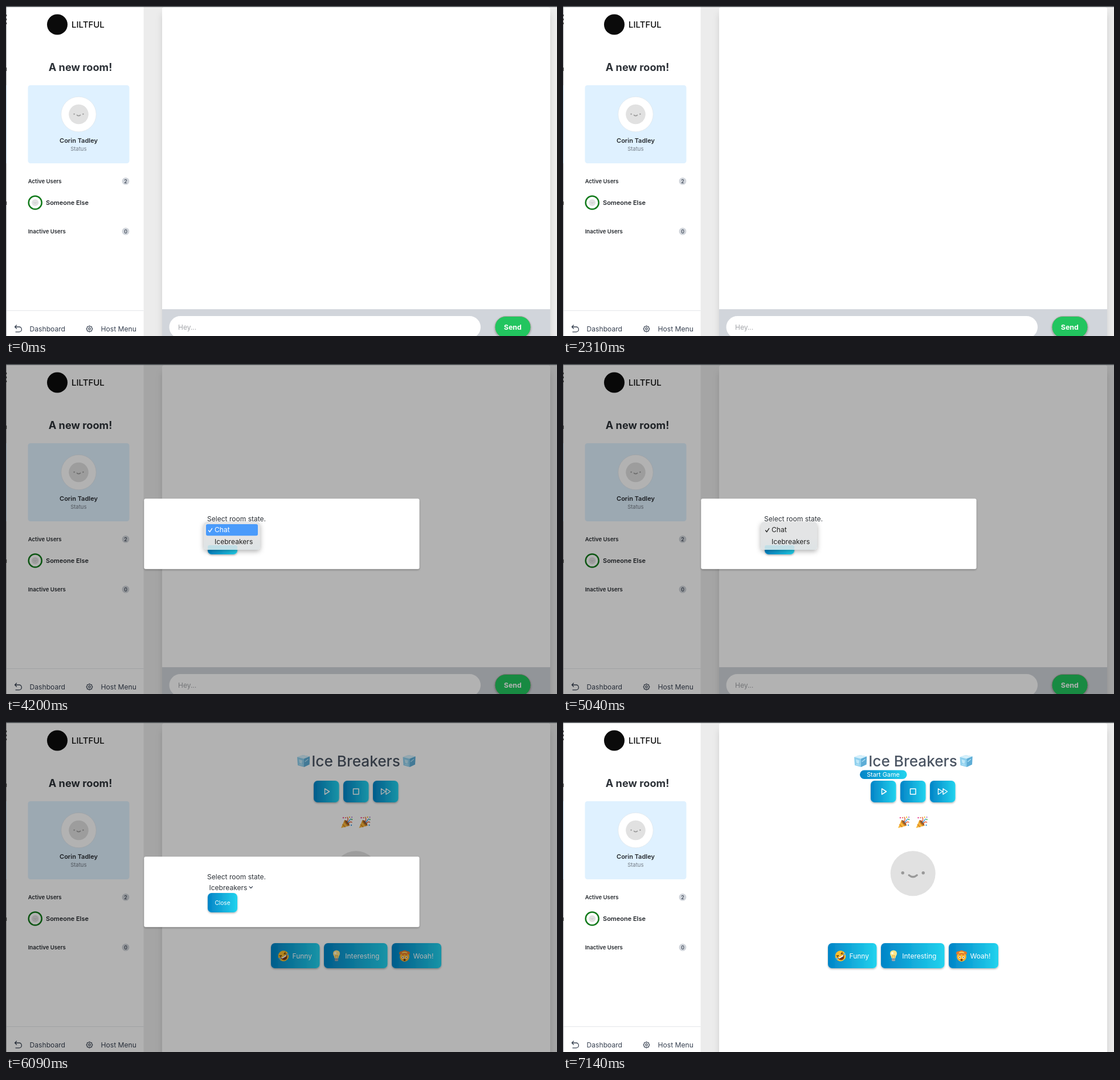
An HTML page for the animation above (8 s loop, 967x579 px).

```html
<!DOCTYPE html>
<html lang="en">
<head>
<meta charset="utf-8">
<title>Room</title>
<style>
html, body { margin: 0; width: 100%; height: 100%; overflow: hidden; background: #ececec; }
svg { display: block; width: 967px; height: 579px; font-family: Inter, Roboto, sans-serif; }
</style>
</head>
<body>
<svg id="stage" viewBox="0 0 967 579"></svg>
<script>
const LOOP = 8000;
const stage = document.getElementById('stage');

const rect = (x, y, w, h, r, fill, more = '') =>
  `<rect x="${x}" y="${y}" width="${w}" height="${h}" rx="${r}" fill="${fill}" ${more}/>`;
const circle = (x, y, r, fill, more = '') =>
  `<circle cx="${x}" cy="${y}" r="${r}" fill="${fill}" ${more}/>`;
const line = (d, color, width, more = '') =>
  `<path d="${d}" fill="none" stroke="${color}" stroke-width="${width}" stroke-linecap="round" stroke-linejoin="round" ${more}/>`;
const shape = (d, fill) => `<path d="${d}" fill="${fill}"/>`;
const text = (s, x, y, size, fill = '#30353b', weight = 400, anchor = 'start') =>
  `<text x="${x}" y="${y}" font-size="${size}" fill="${fill}" font-weight="${weight}" text-anchor="${anchor}">${s}</text>`;
const at = (x, y, art, more = '') => `<g transform="translate(${x} ${y}) ${more}">${art}</g>`;
const group = (id, ...parts) => `<g id="${id}">${parts.join('')}</g>`;

const face = (x, y, r) => at(x, y,
  circle(0, 0, 39.5, '#e1e1e1') + circle(-18, -1, 2.7, '#999') + circle(18, -1, 2.7, '#999') +
  line('M-7 3Q0 9 7 3', '#999', 3.4), `scale(${r / 39.5})`);
const badge = (y, n) => circle(210, y, 6.4, '#d1d5db') + text(n, 210, y + 3.1, 8.8, '#374151', 500, 'middle');
const button = (x, y, w, h) => rect(x, y, w, h, 7, 'url(#sea)', 'filter="url(#soft)"');

// Emoji, each drawn about its own centre
const ice = shape('M-11-7L-1-10.5 11-8 10.5 6 1 10.5-10 7.5Z', '#8fd0ee') +
  shape('M-11-7L-1-10.5 11-8 1-4Z', '#d5f0fb') + shape('M1-4L11-8 10.5 6 1 10.5Z', '#5eadd6') +
  shape('M-8-3L-2-1-3 5-7 3Z', '#c0e8f8') + line('M3 1L8-3M-7 6L-2 7', '#b4e2f5', 1.3);
const popper = shape('M-10 10L-4-4Q4-1 5 6Z', '#f6b73c') + line('M-7 4L-3 8M-4-1L2 6', '#d98220', 1.6) +
  shape('M-4-4Q3-4 5 6Q-1 4-4-4Z', '#8f5b2d') +
  line('M0-2Q4-4 1-9M3 2Q6-2 9 0', '#e4572e', 1.4) + line('M2 0L7-6', '#3c9be0', 1.4) +
  circle(-6, -8, 1.3, '#e9529c') + circle(5, -9, 1.2, '#f2c230') + circle(9, -5, 1.2, '#53b95b') +
  circle(8, 5, 1.2, '#3c9be0') + circle(-2, -8, 1, '#e4572e') + circle(9, -9, 1, '#9d5cc9');
const laugh = circle(0, 0, 9.3, '#fbc02d') +
  line('M-6-4L-2.5-2.5-6-1M6-4L2.5-2.5 6-1', '#6b3e12', 1.3) +
  shape('M-6 1H6Q5 7.5 0 7.5T-6 1Z', '#7a3513') + shape('M-5 1H5L4 3H-4Z', '#fff') +
  shape('M-9-1Q-4 0-7 3Q-10 3-9-1ZM9-1Q4 0 7 3Q10 3 9-1Z', '#4fb3f0');
const bulb = shape('M-3.5 4C-3.5 0-6-1-6-4.5A6 5.5 0 0 1 6-4.5C6-1 3.5 0 3.5 4Z', '#fde68a') +
  circle(-2, -5, 2, '#fffbe6') + line('M-1.5 3L-2-1 0 0 2-1 1.5 3', '#e0a030', .9) +
  rect(-3, 4, 6, 5, 1.5, '#a4a9ad') + line('M-2.5 6H2.5', '#74797d', .8);
const blown = circle(0, 1, 8.4, '#fbb32d') + shape('M-9-3Q-11-9-4-9Q0-12 4-9Q11-9 9-3L5-4 3-1 0-4-3-1-5-4Z', '#e2762b') +
  shape('M-5-5Q-5-8 0-8T5-5L0-6Z', '#f9d65c') + circle(-3.2, 2, 2, '#fff') + circle(3.2, 2, 2, '#fff') +
  circle(-3.2, 2, .9, '#5b3413') + circle(3.2, 2, .9, '#5b3413') +
  `<ellipse cy="6.5" rx="2" ry="1.7" fill="#6b3413"/>`;

const teeth = Array.from({ length: 8 }, (_, i) =>
  `<path d="M0-4.8V-5.8" stroke="#374151" stroke-width="2" transform="rotate(${i * 45})"/>`).join('');
const gear = circle(0, 0, 4.7, 'none', 'stroke="#374151" stroke-width="1.2"') + teeth +
  circle(0, 0, 1.8, 'none', 'stroke="#374151" stroke-width="1.2"');

const defs = `<defs>
<linearGradient id="sea"><stop stop-color="#0284c7"/><stop offset="1" stop-color="#22d3ee"/></linearGradient>
<linearGradient id="glass" x2="0" y2="1"><stop offset=".55" stop-color="#e3e4e5"/><stop offset="1" stop-color="#dde3e5"/></linearGradient>
<filter id="soft" x="-20%" y="-20%" width="140%" height="150%"><feDropShadow dx="0" dy="1.5" stdDeviation="1.5" flood-opacity=".3"/></filter>
<filter id="wide" x="-20%" y="-20%" width="140%" height="150%"><feDropShadow dx="0" dy="3" stdDeviation="4" flood-opacity=".3"/></filter>
<filter id="panelShade" x="-5%" y="-5%" width="110%" height="110%"><feDropShadow dx="0" dy="12" stdDeviation="6" flood-opacity=".13"/></filter>
</defs>`;

const sidebar = group('sidebar',
  rect(0, 0, 241.5, 579, 0, '#fff'),
  rect(0, 0, 1, 579, 0, '#a3a5a8'),
  [15, 22, 29].map(y => rect(0, y, 1.2, 3, 0, '#222')).join(''),
  rect(0, 108, 1.2, 6, 0, '#333'), rect(0, 139, 1, 137, 0, '#a9c0d2'), rect(0, 343, 1.2, 6, 0, '#333'),
  circle(90, 32.5, 18, '#0b0b0b'),
  text('LILTFUL', 115, 38, 15, '#0b0b0b', 500),
  text('A new room!', 130.5, 114.3, 18.2, '#2d3238', 700, 'middle'),
  rect(38.5, 139, 178, 137, 4.5, '#dff1ff'),
  circle(127.5, 190, 30.8, '#fff', 'stroke="#dfe6ec" stroke-width=".8"'),
  face(127.5, 190, 17.3),
  text('Corin Tadley', 127.5, 239.8, 11, '#25292e', 600, 'middle'),
  text('Status', 127.3, 253.5, 9.5, '#737b85', 400, 'middle'),
  text('Active Users', 38.7, 310.8, 9.6, '#25292e', 600), badge(307.4, 2),
  circle(51.2, 345, 11.5, '#fff', 'stroke="#127a1b" stroke-width="2.5"'), face(51.2, 345, 6),
  text('Someone Else', 70, 349, 11, '#25292e', 600),
  text('Inactive Users', 38.7, 398.8, 9.6, '#25292e', 600), badge(395.4, 0),
  rect(1, 534, 240.5, 1, 0, '#e3e6ea'),
  line('M18.5 560L15.5 563 18.5 566M15.5 563H23A4.4 4.4 0 0 1 23 571.8H17', '#374151', 1.3),
  text('Dashboard', 41.6, 570.8, 12.1, '#374151'),
  at(146.5, 566.5, gear),
  text('Host Menu', 166.6, 570.8, 12.1, '#374151'));

const chat = group('chat',
  rect(274, 532, 681, 47, 0, '#d1d5db'),
  rect(286.5, 544, 546.5, 39, 19.5, '#fff'),
  text('Hey...', 302, 568, 12, '#a3a5a9'),
  rect(858, 544.5, 63, 38, 19, '#22c55e', 'stroke="#b3a5a3" stroke-width="1" filter="url(#soft)"'),
  text('Send', 889.3, 568, 12.4, '#fff', 700, 'middle'));

const game = group('game',
  at(522, 68.5, ice), at(707.5, 68.5, ice),
  text('Ice Breakers', 614, 78, 26.2, '#4b5563', 500, 'middle'),
  [540, 592, 644].map(x => button(x, 103, 44.5, 38)).join(''),
  line('M559.5 117V127L567.5 122Z', '#fff', 1.5),
  line('M609.5 117.2H619V126.8H609.5Z', '#fff', 1.5),
  line('M658.5 117V127L666 122ZM667 117V127L674.5 122Z', '#fff', 1.4),
  at(598, 176, popper), at(629.5, 176, popper),
  face(614.2, 265.8, 39.5),
  button(465, 388, 85.5, 44), button(558, 388, 111.5, 44), button(677, 388, 87, 44),
  at(487, 410.5, laugh, 'rotate(-30)'), at(580, 410.5, bulb), at(699.5, 411, blown),
  text('Funny', 502.5, 414.7, 12, '#fff'),
  text('Interesting', 595.3, 414.7, 12, '#fff'),
  text('Woah!', 714.6, 414.7, 12, '#fff'));

const tip = group('tip',
  rect(521, 84.5, 82.5, 15.5, 7.75, 'url(#sea)'),
  text('Start Game', 562, 96, 10.9, '#fff', 400, 'middle'));

const modal = group('modal',
  rect(0, 1, 967, 578, 0, '#000', 'opacity=".3"'),
  rect(242.3, 236.3, 483.2, 123.5, 3, '#fff', 'filter="url(#soft)"'),
  text('Select room state.', 353, 275.7, 12.05),
  rect(353.5, 281.5, 82.5, 17, 3, '#fff', 'id="focus" stroke="#176d9c" stroke-width="1.9"'),
  `<text id="choice" x="356.4" y="294.6" font-size="12.05" fill="#30353b"></text>`,
  line('M427 288.7L429.8 291.5 432.6 288.7', '#374151', 1.2),
  button(354, 300, 52, 34),
  text('Close', 380, 320.8, 10.1, '#fff', 400, 'middle'),
  group('menu',
    rect(347, 277, 99, 49, 5.5, 'url(#glass)', 'filter="url(#wide)"'),
    rect(354, 318, 52, 8, 3, '#b5dfe9', 'opacity=".7"'),
    rect(351, 281, 91, 20.3, 3, '#4a9bfb', 'id="bar"'),
    `<path id="tick" d="M355.5 292L357.6 294.6 361.6 288.6" fill="none" stroke-width="1.4" stroke-linecap="round"/>`,
    `<text id="item0" x="366" y="295.3" font-size="12.1">Chat</text>`,
    `<text id="item1" x="366" y="315.5" font-size="12.1">Icebreakers</text>`));

stage.innerHTML = defs + rect(0, 0, 967, 579, 0, '#ececec') +
  rect(274, 2, 681, 590, 4, '#fff', 'filter="url(#panelShade)"') +
  sidebar + chat + game + tip + modal + rect(0, 0, 967, 1.6, 0, '#3f4347');

const el = id => document.getElementById(id);
const show = (id, on) => el(id).setAttribute('visibility', on ? 'visible' : 'hidden');
const paint = (id, name, value) => el(id).setAttribute(name, value);

function draw(t) {
  const playing = t >= 5460;
  const open = t >= 2870 && t < 6160;
  el('chat').style.display = playing ? 'none' : '';
  el('game').style.display = playing ? '' : 'none';
  el('modal').style.display = open ? '' : 'none';
  show('tip', t >= 7140);
  show('focus', t < 5040);
  el('choice').textContent = playing ? 'Icebreakers' : 'Chat';

  // The chosen row blinks once, then the menu fades
  const row = t < 4620 ? 0 : t >= 5040 && t < 5110 ? -1 : 1;
  el('menu').style.display = t >= 4200 && t < 5390 ? '' : 'none';
  paint('menu', 'opacity', Math.min(1, Math.max(0, (5390 - t) / 210)));
  show('bar', false);
  if (row >= 0) {
    el('bar').removeAttribute('visibility');
    paint('bar', 'y', row ? 301.5 : 281);
  }
  paint('item0', 'fill', row === 0 ? '#fff' : '#222');
  paint('item1', 'fill', row === 1 ? '#fff' : '#222');
  paint('tick', 'stroke', row === 0 ? '#fff' : '#222');
}

const start = performance.now();
function tick() {
  draw((performance.now() - start) % LOOP);
  requestAnimationFrame(tick);
}
tick();
</script>
</body>
</html>
```
